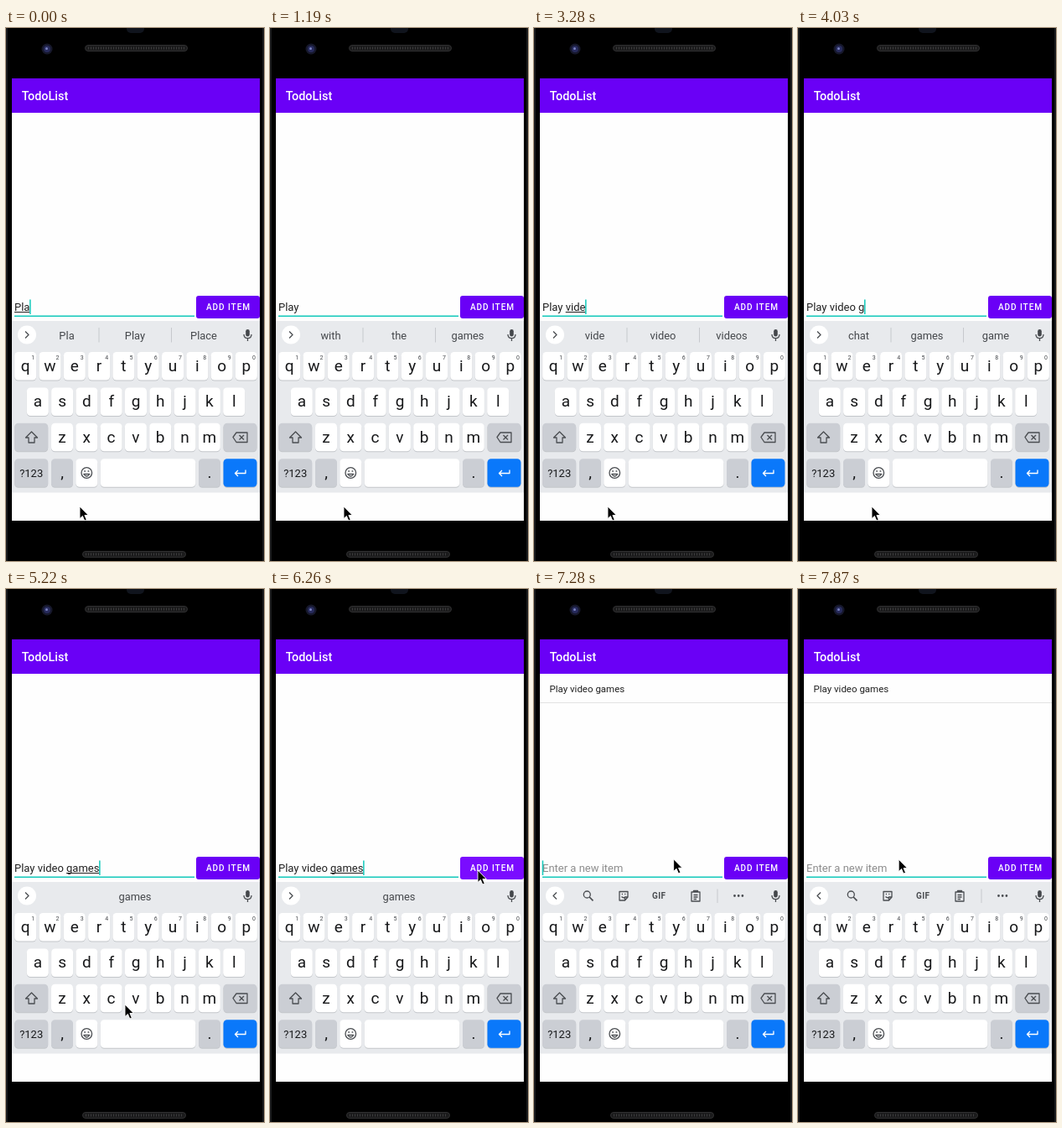
An HTML page for the animation above (8 s loop, 308 by 635 pixels).

```html
<!DOCTYPE html>
<html lang="en">
<head>
<meta charset="utf-8">
<title>Todo list demo</title>
<style>
  html, body { margin: 0; width: 100%; height: 100%; overflow: hidden; background: #000; }
  svg { display: block; width: 308px; height: 635px; font-family: Roboto, sans-serif; }
  text { white-space: pre; }
  .mid { text-anchor: middle; }
  .icon { fill: none; stroke: #4a4d51; stroke-width: 1.3; stroke-linejoin: round; }
</style>
</head>
<body>
<svg viewBox="0 0 308 635">
  <!-- phone body -->
  <rect width="308" height="635"/>
  <path d="M1 0V635M307 0V635" stroke="#222326" stroke-width="1.5"/>
  <rect x="144" y="-6" width="21" height="12" rx="5" fill="#10141d"/>
  <circle cx="49" cy="25" r="6.5" fill="#16182b"/>
  <circle cx="49" cy="25" r="4" fill="#272b5c"/>
  <circle cx="48.5" cy="24.5" r="1.5" fill="#7a82c0"/>
  <g fill="#1b1b1c" stroke="#303031">
    <rect x="94.5" y="20.5" width="122" height="7" rx="3.5"/>
    <rect x="91.5" y="623.5" width="123" height="7" rx="3.5"/>
  </g>
  <path d="M98 24H214M95 627H212" stroke="#3c3c3d" stroke-width="3" stroke-dasharray="1 2"/>

  <!-- app -->
  <rect x="7" y="60" width="296" height="527" fill="#fefefe"/>
  <rect x="7" y="60" width="296" height="41" fill="#6a00f6"/>
  <text x="18.7" y="86" font-size="14.4" font-weight="500" fill="#fff">TodoList</text>
  <g id="item">
    <text x="18.5" y="122.5" font-size="11.5" fill="#212121">Play video games</text>
    <path d="M7 135.5H303" stroke="#e2e2e2"/>
  </g>
  <path d="M10 343.3H225" stroke="#12c9bb" stroke-width="1.5"/>
  <text id="hint" x="10" y="337" font-size="13" fill="#8d8d8d">Enter a new item</text>
  <text id="input" x="10" y="337" font-size="13" fill="#212121"></text>
  <path id="underline" stroke="#212121"/>
  <rect id="caret" y="323.5" width="1.5" height="17.5" fill="#12c9bb"/>
  <rect id="button" x="227" y="319" width="76" height="27" rx="3"/>
  <text class="mid" x="265.5" y="336" font-size="10.1" font-weight="500" letter-spacing=".9" fill="#fff">ADD ITEM</text>

  <!-- keyboard -->
  <rect x="7" y="349" width="296" height="204.5" fill="#e8eaed"/>
  <circle cx="25" cy="365.5" r="11" fill="#fff"/>
  <path id="chevron" class="icon"/>
  <g id="words" font-size="12.9" fill="#44474b">
    <text class="mid" x="72.5" y="370.5"></text>
    <text class="mid" x="154" y="370.5"></text>
    <text class="mid" x="236" y="370.5"></text>
  </g>
  <path id="dividers" d="M111 357V374.5M197.5 357V374.5" stroke="#c6c9cd"/>
  <g id="tools" class="icon">
    <circle cx="63.3" cy="364" r="4"/>
    <path d="M66.2 367L70.5 371.3" stroke-width="1.7"/>
    <path d="M102 360.5H112V367L108.500 371H102ZM112 367H108.500V371M104.500 366.500Q107 369 109.500 366.500M104.800 363.500H106M108.200 363.500H109.400"/>
    <path d="M188 361H198V372H188ZM190.500 361V359.500H195.500V361M190.500 364.500H195.500M190.500 367H195.500M190.500 369.500H194"/>
    <path d="M219 357.500V374" stroke="#c6c9cd" stroke-width="1"/>
    <text class="mid" x="149.300" y="369.300" font-size="10" font-weight="700" letter-spacing=".4" fill="#4a4d51" stroke="none">GIF</text>
    <path d="M239.500 365.500H251" stroke-width="2.800" stroke-linecap="round" stroke-dasharray="0 4.700"/>
  </g>
  <rect x="286.200" y="359" width="4.600" height="8.500" rx="2.300" fill="#44474b"/>
  <path class="icon" d="M284 365Q284 369.700 288.500 369.700T293 365M288.500 370V373"/>
  <g id="keys"></g>
  <g class="icon" stroke-width="1.500">
    <path d="M30.500 481L37.500 488H34V494H27V488H23.500Z"/>
    <path d="M271 487.500L275 482H288V493.500H275ZM278.500 485L284 490.500M284 485L278.500 490.500"/>
    <circle cx="96.300" cy="530" r="6.300"/>
    <path d="M92.800 531.500Q96.300 536.500 99.800 531.500ZM93.300 528H95M97.600 528H99.300"/>
    <path d="M286 526.500V530.500H273.500M277 527L273.500 530.500L277 534" stroke="#fff"/>
  </g>
  <path id="pointer" d="M0 0V14.500L3.400 11.400L5.800 17L8.300 16L5.900 10.500H10.300Z" stroke="#fff" stroke-width=".9"/>
</svg>
<script>
const LOOP = 8000, STEP = 148.6;
const $ = id => document.getElementById(id);
const show = (id, on) => $(id).style.display = on ? '' : 'none';

// Keyboard
function key(x, y, w, label = '', fill = '#fff', size = 19, digit = '') {
  const cx = x + w / 2;
  return `<rect x="${x}" y="${y + 1}" width="${w}" height="33.5" rx="4.5" fill="#c3c6ca"/>
    <rect x="${x}" y="${y}" width="${w}" height="33.5" rx="4.5" fill="${fill}"/>
    <text class="mid" x="${cx}" y="${y + (size < 19 ? 21.5 : 22.8)}" font-size="${size}" fill="#17181a">${label}</text>
    <text class="mid" x="${cx + 9}" y="${y + 8.5}" font-size="7" fill="#44474b">${digit}</text>`;
}
const row = (letters, x, y, digits = '') =>
  [...letters].map((c, i) => key(x + i * 29.3, y, 26, c, '#fff', 19, digits[i])).join('');
const GREY = '#cbced4';
$('keys').innerHTML =
  row('qwertyuiop', 10.2, 386, '1234567890') +
  row('asdfghjkl', 24.8, 428.5) +
  key(10.2, 470.7, 40, '', GREY) + row('zxcvbnm', 54, 470.7) + key(259.5, 470.7, 40, '', GREY) +
  key(10.2, 513.2, 40, '?123', GREY, 13) + key(54, 513.2, 26, ',', GREY) +
  key(83.3, 513.2, 26) + key(112.8, 513.2, 113.5) + key(230, 513.2, 26, '.', GREY) +
  key(259.5, 513.2, 40, '', '#0a78fa');

// Typing: time, text, underlined range, suggestions
const typing = [
  [0, 'Pla', 0, 3, 'Pla Play Place'],
  [300, 'Play', 0, 3, 'Pla Play Place'],
  [450, 'Play', 0, 4, 'Play Playing Played'],
  [590, 'Play ', 0, 0, 'Play Playing Played'],
  [740, 'Play ', 0, 0, 'with the games'],
  [1640, 'Play v', 0, 0, 'with the games'],
  [1790, 'Play v', 5, 6, 'v video volleyball'],
  [2380, 'Play vi', 5, 6, 'v video volleyball'],
  [2680, 'Play vi', 5, 7, 'vi video videos'],
  [2980, 'Play vid', 5, 7, 'vi video videos'],
  [3130, 'Play vide', 5, 8, 'vid video videos'],
  [3280, 'Play vide', 5, 9, 'vide video videos'],
  [3580, 'Play video', 5, 9, 'vide video videos'],
  [3730, 'Play video', 5, 10, 'video videos video\u00a0game'],
  [4030, 'Play video g', 0, 0, 'chat games game'],
  [4330, 'Play video ga', 11, 12, 'g games game'],
  [4480, 'Play video gam', 11, 13, 'ga games game'],
  [4620, 'Play video game', 11, 14, 'gam games game'],
  [4920, 'Play video games', 11, 15, 'game games gas'],
  [5220, 'Play video games', 11, 16, ' games '],
  [6400, '', 0, 0, ' games '],
  [6550, '', 0, 0, null]
];
const caretOff = [[1190, 1640], [2230, 2380], [5520, 5960], [6840, 7280], [7870, LOOP]];

const pen = document.createElement('canvas').getContext('2d');
function textWidth(s) {
  pen.font = '13px Roboto, sans-serif';
  return pen.measureText(s).width;
}

// Pointer moves in hard steps, slowing towards each end point
function glide(t, start, steps, power) {
  const u = Math.min(1, Math.floor((t - start) / STEP + .05) / steps);
  return 1 - (1 - u) ** power;
}
function pointerAt(t) {
  if (t < 5220) return [88, 570];
  if (t < 6840) {
    const p = glide(t, 5220, 6, 1.6);
    return [142 + 106 * p, 495 - 160 * p];
  }
  const p = glide(t, 6840 - STEP, 8, 1.3);
  return [248 - 137 * p, 335 - 12.5 * p - 6 * Math.sin(Math.PI * p)];
}

function draw(now) {
  const t = now % LOOP;
  const [, text, from, to, words] = typing.findLast(s => s[0] <= t);
  const added = t >= 6400, tools = words === null;

  $('input').textContent = text;
  show('hint', !text);
  show('item', added);
  const x = i => 10 + textWidth(text.slice(0, i));
  $('underline').setAttribute('d', to ? `M${x(from)} 338.5H${x(to)}` : '');
  $('caret').setAttribute('x', x(text.length) - .3);
  show('caret', !caretOff.some(([a, b]) => t >= a && t < b));
  $('button').setAttribute('fill', t >= 6260 && t < 6550 ? '#7a0cff' : '#6a00f6');

  const list = tools ? [] : words.split(' ');
  [...$('words').children].forEach((el, i) => el.textContent = list[i] || '');
  show('dividers', !!list[0]);
  show('tools', tools);
  $('chevron').setAttribute('d', tools ? 'M27 361.5L23 365.5L27 369.5' : 'M23 361.5L27 365.5L23 369.5');
  $('pointer').setAttribute('transform', `translate(${pointerAt(t)})`);
  requestAnimationFrame(draw);
}
requestAnimationFrame(draw);
</script>
</body>
</html>
```
